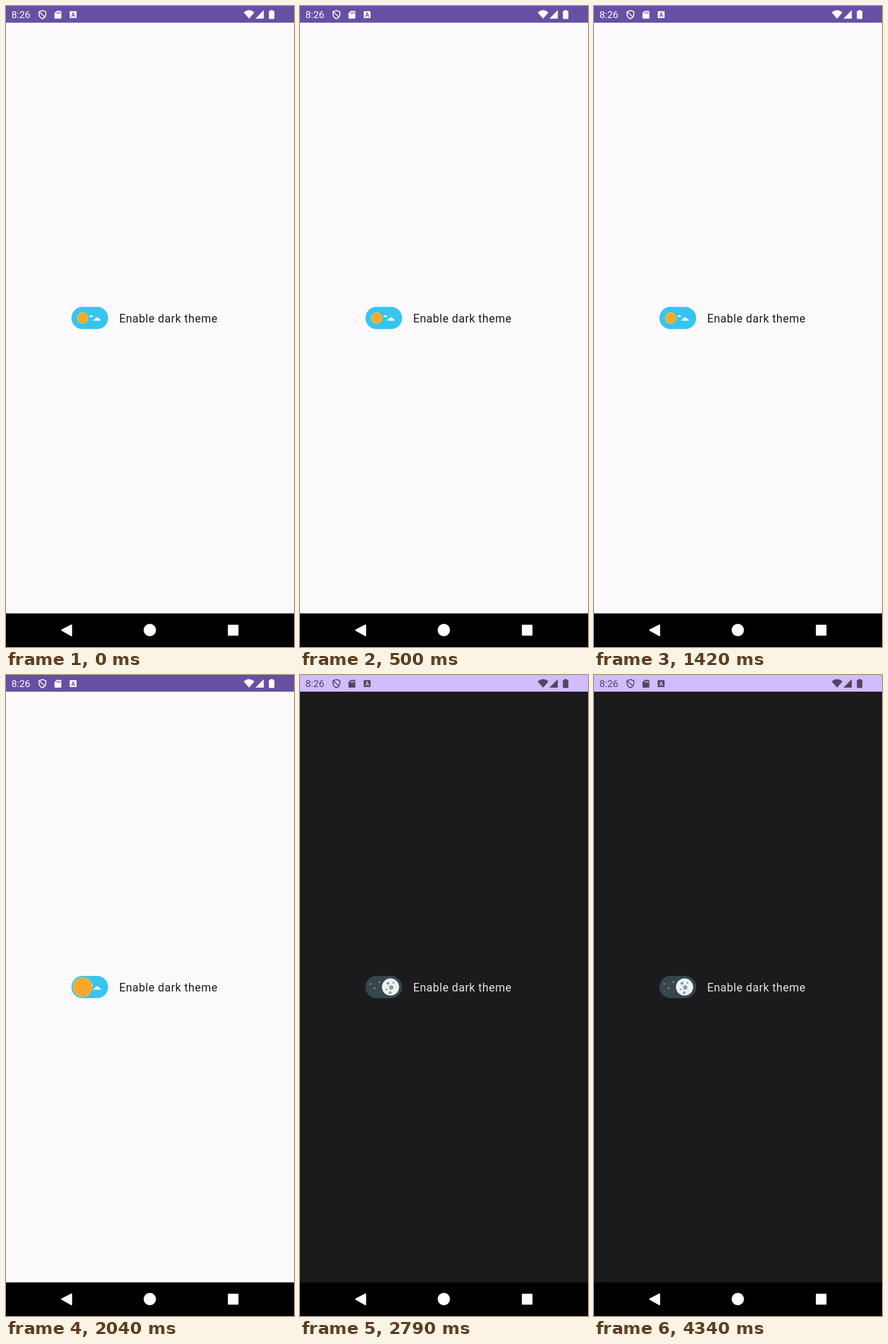
An HTML page for the animation above (4420 ms loop, 502 by 1116 pixels).

```html
<!DOCTYPE html>
<html lang="en">
<head>
<meta charset="utf-8">
<title>Theme switch</title>
<style>
html, body { margin: 0; width: 100%; height: 100%; overflow: hidden; background: #000; }
svg { display: block; width: 502px; height: 1116px; font-family: Roboto, sans-serif; --page: #fcfafd; --ink: #1c1b1f; --bar: #6650a4; --icon: #fff; }
svg.dark { --page: #1b1b1d; --ink: #e6e1e5; --bar: #d0bcff; }
svg.dim { --icon: #51465f; }
#page { fill: var(--page); }
#bar, .cut { fill: var(--bar); }
#label { fill: var(--ink); font-size: 19.53px; letter-spacing: .61px; }
#status { fill: var(--icon); }
</style>
</head>
<body>
<svg id="stage" viewBox="0 0 502 1116">
  <rect id="page" width="502" height="1058"/>
  <rect id="bar" width="502" height="29"/>
  <g id="status">
    <text x="9.5" y="21" font-size="17.1">8:26</text>
    <path d="M63.5 7.8L69.4 10V14.5Q69.4 19.6 63.5 22.2Q57.6 19.6 57.6 14.5V10ZM58.5 10.5L68 19.5" fill="none" stroke="var(--icon)" stroke-width="1.7"/>
    <path d="M88.5 8.5H95Q96.5 8.5 96.5 10V20.5Q96.5 22 95 22H86Q84.5 22 84.5 20.5V12.5Z"/>
    <path class="cut" d="M88.5 10.5h1.4v3h-1.4zM91 10.5h1.4v3h-1.4zM93.5 10.5h1.4v3h-1.4z"/>
    <rect x="111" y="9" width="12" height="12" rx="1.3"/>
    <text class="cut" x="117" y="18.5" font-size="10" font-weight="700" text-anchor="middle">A</text>
    <path d="M414.3 11.2Q423.7 3.4 433 11.2L423.7 22Z"/>
    <path d="M449.3 7.3V22H434.7Z"/>
    <path d="M461 7h4v1.6h1.8q1 0 1 1V21.4q0 1-1 1H459.200q-1 0-1-1V9.600q0-1 1-1H461Z"/>
  </g>

  <clipPath id="clip"><rect x="114" y="523.7" width="64" height="39" rx="19.5"/></clipPath>
  <g clip-path="url(#clip)">
    <rect id="track" x="114" y="523.7" width="64" height="39"/>
    <g id="clouds" fill="#fff">
      <path d="M144.500 541.200Q145 539.500 146.600 539.500Q147.500 537.200 149.500 538.200Q150.500 539.300 152.300 541.200Z"/>
      <path d="M152 547.800Q152 545.500 154.600 545.200Q156.500 540.700 160.300 542.500Q162 543.300 162.200 544.500Q165 545.200 165 547.800Z"/>
    </g>
    <g id="stars"></g>
    <g id="ball">
      <circle id="disc" r="1"/>
      <g id="craters" fill="#8c989e"></g>
    </g>
  </g>
  <text id="label" x="197.200" y="551">Enable dark theme</text>

  <rect y="1057.500" width="502" height="58.500"/>
  <g fill="#fff" stroke="#fff" stroke-linejoin="round">
    <path d="M97.500 1086.700L114 1078V1096Z" stroke-width="2.500"/>
    <circle cx="250.700" cy="1086.500" r="10.500" stroke-width=".6"/>
    <rect x="388" y="1078.500" width="16" height="16.500" stroke-width="2.500"/>
  </g>
</svg>
<script>
const LOOP = 4420, PRESS = 1900, THEME = 2085, REPLAY = 2120, ICONS = 2250;
const $ = id => document.getElementById(id);
const mix = (a, b, p) => a + (b - a) * p;
const color = (a, b, p) => `rgb(${a.map((v, i) => Math.round(mix(v, b[i], p)))})`;
const ease = (t, from, to) => {
  const p = Math.min(1, Math.max(0, (t - from) / (to - from)));
  return p * p * (3 - 2 * p);
};
const dots = (id, list) => $(id).innerHTML = list.map(([x, y, r, fill = '']) =>
  `<circle cx="${x}" cy="${y}" r="${r}" ${fill && `fill="${fill}"`}/>`).join('');

const gold = '#d9b74a', faint = '#5d8190';
dots('stars', [[122.3, 538, 1.2, gold], [130, 545.2, 1.2, gold], [138.3, 534.8, 1.3, gold],
  [131.500, 538, .8, faint], [124, 549.500, .8, faint], [138.800, 551, .8, faint]]);
dots('craters', [[-4.3, -6.500, 2.500], [5, -7.300, 1.600], [1.200, .8, 3.700], [-6.800, 4.400, 1.500], [-.6, 10, 2.400]]);

function draw(now) {
  const t = now % LOOP;
  const dark = t >= THEME;
  // The recreated screen plays the switch again from its start.
  const s = t - (dark ? REPLAY : PRESS);
  const grow = ease(s, 0, 140), slide = ease(s, 180, 400), settle = ease(s, 380, 540);
  const radius = mix(mix(9.8, 16.8, grow), 14.8, settle);
  const x = mix(133.4, 157.8, slide);

  $('stage').setAttribute('class', `${dark ? 'dark' : ''} ${t >= ICONS ? 'dim' : ''}`);
  $('track').setAttribute('fill', color([55, 197, 239], [53, 70, 79], slide));
  $('ball').setAttribute('transform', `translate(${x} 543.2)`);
  $('disc').setAttribute('r', radius - .5);
  $('disc').setAttribute('fill', color([255, 167, 38], [236, 244, 242], slide));
  $('disc').setAttribute('stroke', color([247, 196, 66], [236, 244, 242], slide));
  $('disc').setAttribute('stroke-width', 1.3);
  $('craters').setAttribute('transform', `scale(${radius / 14.8})`);
  $('craters').setAttribute('opacity', slide);
  $('clouds').setAttribute('opacity', 1 - slide);
  $('stars').setAttribute('opacity', slide);
}

const start = performance.now();
function tick() {
  draw(performance.now() - start);
  requestAnimationFrame(tick);
}
tick();
</script>
</body>
</html>
```
